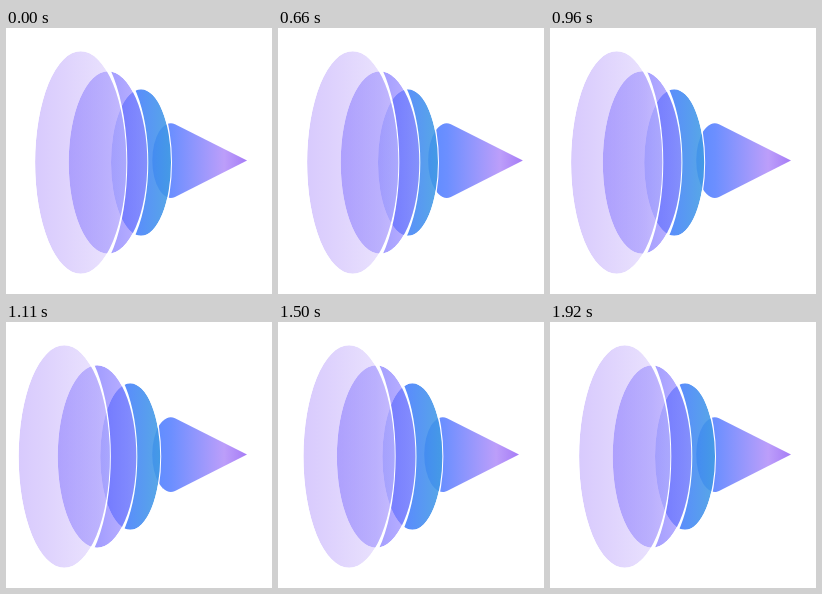
Animation of 266x266 px, one loop 2.76 s. Source, as an HTML page:

```html
<!DOCTYPE html>
<html>
<head>
<meta charset="utf-8">
<style>
html, body { margin: 0; height: 100%; overflow: hidden; background: #fff; }
svg { display: block; width: 100vw; height: 100vh; }
</style>
</head>
<body>
<svg viewBox="0 0 266 266">
  <defs>
    <linearGradient id="cone-fill">
      <stop offset="0" stop-color="#5c8cff"/>
      <stop offset=".2" stop-color="#6c8fff"/>
      <stop offset=".76" stop-color="#bc9efa"/>
      <stop offset="1" stop-color="#a67cf6"/>
    </linearGradient>
    <linearGradient id="small-fill">
      <stop offset="0" stop-color="#4a74ff" stop-opacity=".88"/>
      <stop offset=".45" stop-color="#437ffa" stop-opacity=".88"/>
      <stop offset="1" stop-color="#409ce2" stop-opacity=".88"/>
    </linearGradient>
    <linearGradient id="middle-fill">
      <stop offset="0" stop-color="#6c66ff" stop-opacity=".68"/>
      <stop offset=".5" stop-color="#776fff" stop-opacity=".68"/>
      <stop offset="1" stop-color="#9c8cff" stop-opacity=".65"/>
    </linearGradient>
    <linearGradient id="large-fill">
      <stop offset="0" stop-color="#b195fb" stop-opacity=".5"/>
      <stop offset=".3" stop-color="#bda5fb" stop-opacity=".5"/>
      <stop offset="1" stop-color="#dccffc" stop-opacity=".5"/>
    </linearGradient>
  </defs>
  <path id="cone" fill="url(#cone-fill)" d="M241 132.6L169 168.9A18.5 37.3 0 1 1 169 96.3Z"/>
  <g id="small"></g>
  <g id="middle"></g>
  <g id="large"></g>
</svg>
<script>
const LOOP = 2760;

// A translucent disc with a white rim that cuts the shape behind it.
function disc(id, cx, rx, ry) {
  const oval = (a, b) => `M${cx - a} 134.5a${a} ${b} 0 1 1 ${2 * a} 0a${a} ${b} 0 1 1 ${-2 * a} 0Z`;
  document.getElementById(id).innerHTML =
    `<path d="${oval(rx, ry)}" fill="url(#${id}-fill)"/>` +
    `<path d="${oval(rx + 1, ry * 1.08)}${oval(rx, ry)}" fill="#fff" fill-rule="evenodd"/>`;
}
disc('small', 135, 30, 73.2);
disc('middle', 102, 39.3, 91.2);
disc('large', 74.7, 45.6, 111.3);

// Push out evenly from start to peak, then settle back over a given time.
const moves = [
  { id: 'cone', shift: 17.5, start: 0, peak: 450, back: 450, settle: 360, power: 1.7 },
  { id: 'small', shift: -10.8, start: 540, peak: 800, back: 1110, settle: 480, power: 1.7 },
  { id: 'middle', shift: -11, start: 700, peak: 990, back: 1110, settle: 810, power: 1.6 },
  { id: 'large', shift: -16.5, start: 820, peak: 1110, back: 1110, settle: 690, power: 1.8 }
];
const clamp = v => Math.min(1, Math.max(0, v));

function draw(now) {
  const t = now % LOOP;
  for (const m of moves) {
    const out = clamp((t - m.start) / (m.peak - m.start));
    const rest = (1 - clamp((t - m.back) / m.settle)) ** m.power;
    document.getElementById(m.id)
      .setAttribute('transform', `translate(${m.shift * out * rest} 0)`);
  }
}

const begin = performance.now();
function tick() {
  draw(performance.now() - begin);
  requestAnimationFrame(tick);
}
tick();
</script>
</body>
</html>
```
